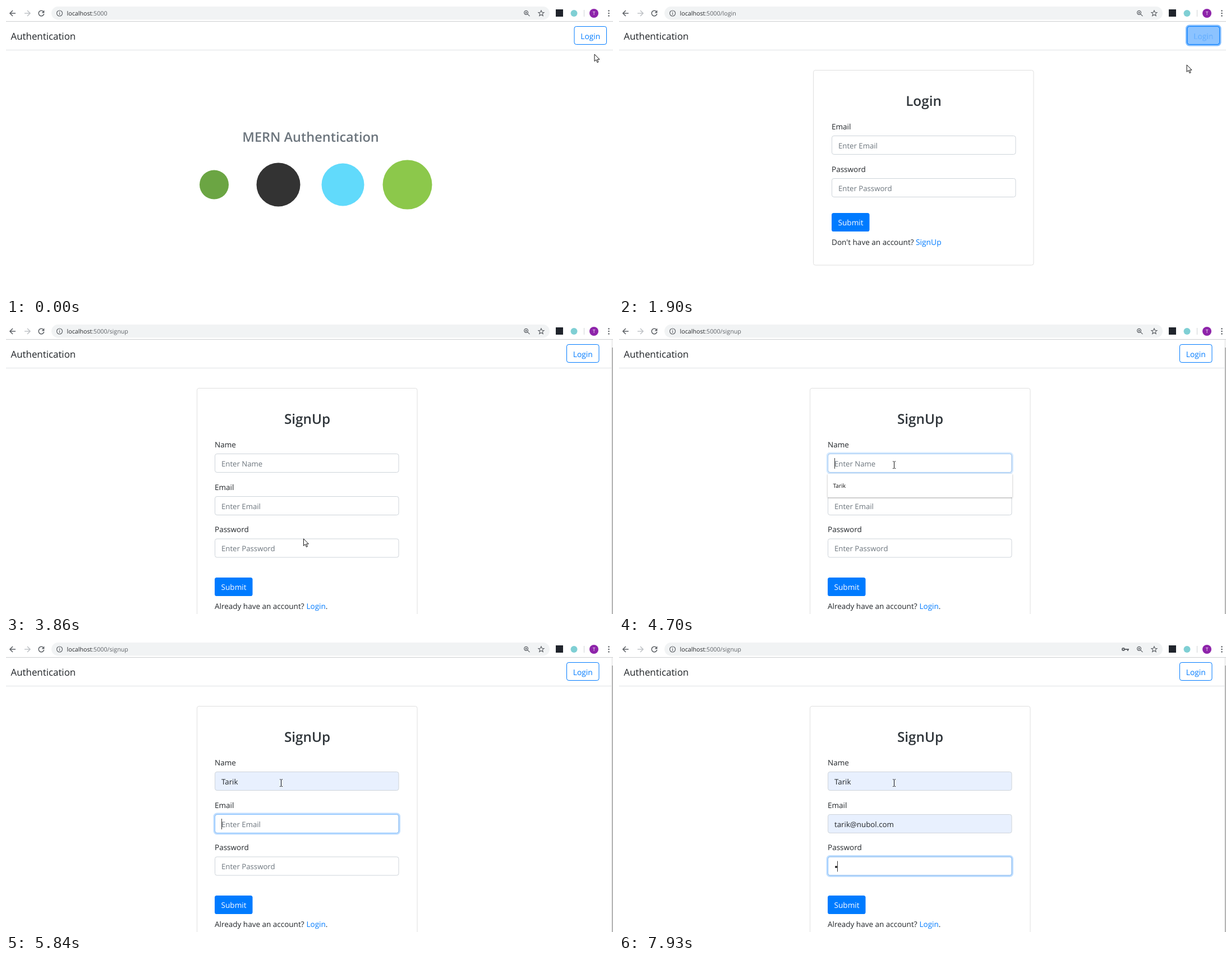
An HTML page with a canvas that plays this animation: 1082 by 517 pixels, repeating every 8000 ms.

```html
<!DOCTYPE html>
<html lang="en">
<head>
<meta charset="utf-8">
<title>Authentication</title>
<style>
  html, body { margin: 0; width: 100%; height: 100%; overflow: hidden; background: #fff; }
  canvas { display: block; }
</style>
</head>
<body>
<canvas id="stage" width="1082" height="517"></canvas>
<script>
const ctx = document.getElementById('stage').getContext('2d');
const LOOP = 8000;
const SANS = '"Open Sans", "Noto Sans", sans-serif';
const ARIAL = '"Liberation Sans", Arial, sans-serif';
const BLUE = '#007bff', INK = '#212529', GRAY = '#6c757d', ICON = '#5f6368', FILLED = '#e8f0fe';
const NAME = 'Tarik', MAIL = 'tarik@nubol.com';

// Bursts of screen updates: first, last, count
const bursts = [
  [0, 0, 1], [1050, 1290, 4], [1440, 1440, 1], [1600, 1600, 1], [1690, 2060, 6],
  [2220, 2980, 11], [3060, 3060, 1], [3220, 3450, 4], [3600, 3600, 1], [3750, 4140, 6],
  [4290, 4700, 6], [4750, 4750, 1], [4990, 4990, 1], [5520, 5520, 1], [5670, 5840, 3],
  [6310, 6380, 2], [6850, 6850, 1], [7000, 7240, 4], [7630, 7630, 1], [7930, 7930, 1]
];
const ticks = bursts.flatMap(([a, b, n]) =>
  Array.from({ length: n }, (_, i) => Math.round((a + (n > 1 ? (b - a) * i / (n - 1) : 0)) / 10) * 10));
const snap = t => ticks.filter(k => k <= t).pop();

// Pointer route: time, x, y
const route = [
  [0, 1049, 86], [970, 1049, 86], [1130, 1049, 64], [1290, 1042, 41], [1440, 1048, 42],
  [1600, 1049, 51], [1690, 1049, 51], [2060, 958, 184], [2680, 574, 342], [2980, 540, 429],
  [3060, 539, 427], [3450, 538, 415], [3600, 537, 414], [3750, 537, 414],
  [4140, 505, 262], [4540, 490, 251], [LOOP, 490, 251]
];

function pointer(t) {
  const i = Math.max(1, route.findIndex(p => p[0] > t));
  const [a, x, y] = route[i - 1], [b, u, v] = route[i];
  const k = (t - a) / (b - a);
  return [x + (u - x) * k, y + (v - y) * k];
}

// Eased 150 ms transition starting at a
function ramp(t, a) {
  const k = Math.min(1, Math.max(0, (t - a) / 150));
  return k * k * (3 - 2 * k);
}
const between = (t, a, b) => t >= a && t < b;
const inside = ([px, py], [x, y, w, h]) => px >= x && px < x + w && py >= y && py < y + h;

function text(s, x, y, { size = 13.5, color = INK, weight = 400, align = 'left', font = SANS } = {}) {
  ctx.font = `${weight} ${size}px ${font}`;
  ctx.fillStyle = color;
  ctx.textAlign = align;
  ctx.fillText(s, x, y);
  return ctx.measureText(s).width;
}

function rect(x, y, w, h, color) {
  ctx.fillStyle = color;
  ctx.fillRect(x, y, w, h);
}

function box(x, y, w, h, r, fill, stroke, line = 1) {
  ctx.beginPath();
  ctx.roundRect(x, y, w, h, r);
  if (fill) { ctx.fillStyle = fill; ctx.fill(); }
  if (stroke) { ctx.strokeStyle = stroke; ctx.lineWidth = line; ctx.stroke(); }
}

function disc(x, y, r, color) {
  ctx.beginPath();
  ctx.arc(x, y, r, 0, 7);
  ctx.fillStyle = color;
  ctx.fill();
}

function shape(d, x, y, stroke, fill, line = 1) {
  const p = new Path2D(d);
  ctx.save();
  ctx.translate(x, y);
  if (fill) { ctx.fillStyle = fill; ctx.fill(p); }
  if (stroke) { ctx.strokeStyle = stroke; ctx.lineWidth = line; ctx.stroke(p); }
  ctx.restore();
}

function faded(alpha, draw) {
  if (alpha <= 0) return;
  ctx.save();
  ctx.globalAlpha = alpha;
  draw();
  ctx.restore();
}

function ring(x, y, w, h, alpha) {
  faded(alpha, () => box(x - 1.5, y - 1.5, w + 3, h + 3, 5, null, BLUE, 3));
}

function browser(t) {
  rect(0, 27, 1082, 1, '#cdcfd1');
  box(81, 1, 888, 23.5, 12, '#f1f3f4');
  const back = 'M5 0H-5M0 -5L-5 0L0 5';
  shape(back, 12, 13, ICON, null, 1.6);
  shape('M-5 0H5M0 -5L5 0L0 5', 38, 13, '#c0c3c7', null, 1.6);
  shape('M3.4 -3.4A4.8 4.8 0 1 0 4.7 1', 63, 13, ICON, null, 1.6);
  shape('M5.3 -5.5V-.6H.4Z', 63, 13, null, ICON);
  shape('M5 0A5 5 0 1 1 -5 0A5 5 0 1 1 5 0M0 -.8V2.8M0 -3V-1.8', 95.5, 13, ICON, null, 1.2);

  const url = { size: 10.7, color: '#27292c' };
  const x = 108.5 + text('localhost', 108.5, 17, url);
  const path = t < 1600 ? '' : t < 3750 ? '/login' : '/signup';
  text(':5000' + path, x, 17, { size: 10.7, color: ICON });

  if (t >= 7930) {
    shape('M-2 0A2 2 0 1 1 -6 0A2 2 0 1 1 -2 0M-2 0H6M4 0V3', 903, 13, ICON, null, 2);
  }
  shape('M2 -1.2A3.4 3.4 0 1 1 -4.8 -1.2A3.4 3.4 0 1 1 2 -1.2M1.2 1.4L5 5.2M-3 -1.2H.3M-1.4 -2.8V.4', 928.5, 13, ICON, null, 1.2);
  shape('M0 -5L1.5 -1.7 5 -1.4 2.3 .9 3.2 4.5 0 2.5 -3.2 4.5 -2.3 .9 -5 -1.4 -1.5 -1.7Z', 954, 13, ICON, null, 1.2);
  rect(980, 6, 13, 13, '#20242c');
  disc(1012.5, 13, 6, '#7fcfd4');
  rect(1030, 7, 1, 12, '#d0d3d6');
  disc(1048, 13, 8, '#8e24aa');
  text(NAME[0], 1048, 16, { size: 8.5, color: '#fff', align: 'center' });
  for (const y of [8.5, 13, 17.5]) disc(1074.5, y, 1.3, ICON);
}

function navbar(t, right) {
  rect(0, 78, 1082, 1, '#dfe2e5');
  text('Authentication', 8.5, 59.5, { size: 16.9 });
  const x = right - 57.5, hot = ramp(t, 1100) * (1 - ramp(t, 1760));
  const focus = t < 3750 ? ramp(t, 1550) * (1 - ramp(t, 3180)) : 0;
  ring(x, 36.5, 57.5, 32, focus * .5);
  box(x, 36.5, 57.5, 32, 3.6, '#fff', BLUE);
  const label = color => text('Login', x + 28.8, 59, { size: 13.8, color, align: 'center' });
  label(BLUE);
  faded(hot, () => { box(x, 36.5, 57.5, 32, 3.6, BLUE, BLUE); label('#fff'); });
}

function home() {
  text('MERN Authentication', 543, 241.5, { size: 23.5, weight: 600, color: GRAY, align: 'center' });
  disc(371, 318.5, 26, '#6ba543');
  disc(485.5, 318.5, 39, '#333');
  disc(600.5, 318.5, 38, '#61dafb');
  disc(715.5, 318.5, 44, '#8cc84b');
}

function card(x, h, title) {
  box(x + .5, 114.5, 392.5, h, 3.6, '#fff', '#dfdfdf');
  text(title, x + 197, 177.5, { size: 24.3, weight: 600, color: '#2f353a', align: 'center' });
}

function field(x, y, label, { value = '', focus = 0, filled = false, preview = false, caret = -1 } = {}) {
  text(label, x, y - 11.5);
  ring(x + .5, y + .5, 327.5, 33, focus * .25);
  box(x + .5, y + .5, 327.5, 33, 3.6, filled ? FILLED : '#fff', '#ced4da');
  faded(focus, () => box(x + .5, y + .5, 327.5, 33, 3.6, null, '#80bdff'));
  if (value === '•') disc(x + 15, y + 18.5, 2, '#222');
  else if (preview) text(value, x + 12, y + 23, { size: 12, font: ARIAL });
  else if (value) text(value, x + 12, y + 22.5, { size: 13.3 });
  else if (caret < 5) text('Enter ' + label, x + 12, y + 22.5, { size: 13.2, color: GRAY });
  if (caret >= 0) rect(x + 12 + caret, y + 8, 1, 19, '#333');
}

function submit(x, y) {
  box(x, y, 67.5, 33, 3.6, BLUE);
  text('Submit', x + 34, y + 22, { size: 13.6, color: '#fff', align: 'center' });
}

function login(hover) {
  card(346, 347.5, 'Login');
  field(379, 231, 'Email');
  field(379, 307, 'Password');
  submit(379, 369);
  text("Don't have an account?", 379, 425.5, { size: 13.55 });
  const color = hover ? '#0056b3' : BLUE;
  const w = text('SignUp', 529, 425.5, { size: 13.8, color });
  if (hover) rect(529, 427, w, 1, color);
}

function menu(y, label, active, alpha) {
  faded(alpha, () => {
    ctx.save();
    ctx.shadowColor = 'rgba(0,0,0,.35)';
    ctx.shadowBlur = 3;
    ctx.shadowOffsetY = 1;
    box(372, y, 329, 42, 1, '#fff');
    ctx.restore();
    if (active) rect(372, y + 6, 328.5, 29.5, '#e6e8eb');
    text(label, 381.5, y + 24.5, { size: 10.2, color: '#111' });
  });
}

function signup(t) {
  card(340, 430, 'SignUp');
  field(372, 231, 'Name', {
    value: t < 4990 ? '' : t < 5520 ? NAME[0] : NAME,
    focus: ramp(t, 4610) * (1 - ramp(t, 5690)),
    filled: t >= 5520,
    preview: between(t, 5520, 5670),
    caret: between(t, 4620, 4990) ? 0 : between(t, 4990, 5520) ? 8 : -1
  });
  field(372, 307, 'Email', {
    value: t < 6850 ? '' : MAIL,
    focus: ramp(t, 5690) * (1 - ramp(t, 7050)),
    filled: t >= 6850,
    preview: between(t, 6850, 7000),
    caret: between(t, 5750, 6310) ? 0 : -1
  });
  field(372, 382.5, 'Password', {
    value: t < 7930 ? '' : '•',
    focus: ramp(t, 7050),
    caret: between(t, 7080, 7630) ? 0 : t >= 7930 ? 5 : -1
  });
  submit(372, 452);
  text('Already have an account?', 372, 508, { size: 13.5 });
  const w = text('Login', 535.5, 508, { size: 13.5, color: BLUE });
  text('.', 535.5 + w, 508);
  if (between(t, 4620, 5670)) menu(267, NAME, t >= 5520, 1);
  if (between(t, 6310, 7000)) menu(342, MAIL, t >= 6850, t < 6380 ? .5 : 1);
  rect(1079, 28, 3, 489, '#f1f1f1');
  rect(1080, 42, 2, 475, '#b4b4b4');
}

function cursor(kind, x, y) {
  if (kind === 'text') {
    shape('M-2.5 -6H-.7M.7 -6H2.5M0 -5.5V6M-2.5 6.5H-.7M.7 6.5H2.5', x + .5, y, '#111');
  } else if (kind === 'hand') {
    shape('M-1.5 10V1.2Q-1.5 0 0 0T1.5 1.2V6Q3 5 4 6.3 5.5 5.5 6.5 7 8 6.5 8.5 8V12Q8.5 14 7 17.5H0Q-1 15 -4 11.5 -5 9.5 -3.5 9Z' +
      'M1.5 6V9M4 6.3V9M6.5 7V9.5', x, y, '#111', '#fff');
  } else {
    shape('M0 0V12.5L3 9.8 5 14.7 7 13.8 5 9.2H9Z', x, y, '#111', '#fff');
  }
}

function hit(page, p) {
  const over = (...r) => inside(p, r);
  if (page === 'signup') return [231, 307, 383].some(y => over(372, y, 328, 34)) ? 'text' : 'arrow';
  if (over(1012, 36, 59, 33)) return 'hand';
  if (page === 'login') {
    if (over(528, 412, 47, 16)) return 'hand';
    if (over(379, 231, 328, 34) || over(379, 307, 328, 34)) return 'text';
  }
  return 'arrow';
}

function draw(t) {
  rect(0, 0, 1082, 517, '#fff');
  const page = t < 1690 ? 'home' : t < 3830 ? 'login' : 'signup';
  const p = pointer(t), kind = hit(page, p);
  browser(t);
  navbar(t, page === 'signup' ? 1057 : 1070.5);
  if (page === 'home') home();
  else if (page === 'login') login(kind === 'hand' && p[1] > 400);
  else signup(t);
  cursor(kind, ...p);
}

ctx.textRendering = 'geometricPrecision';
const start = performance.now();
function frame() {
  draw(snap((performance.now() - start) % LOOP));
  requestAnimationFrame(frame);
}
frame();
</script>
</body>
</html>
```
